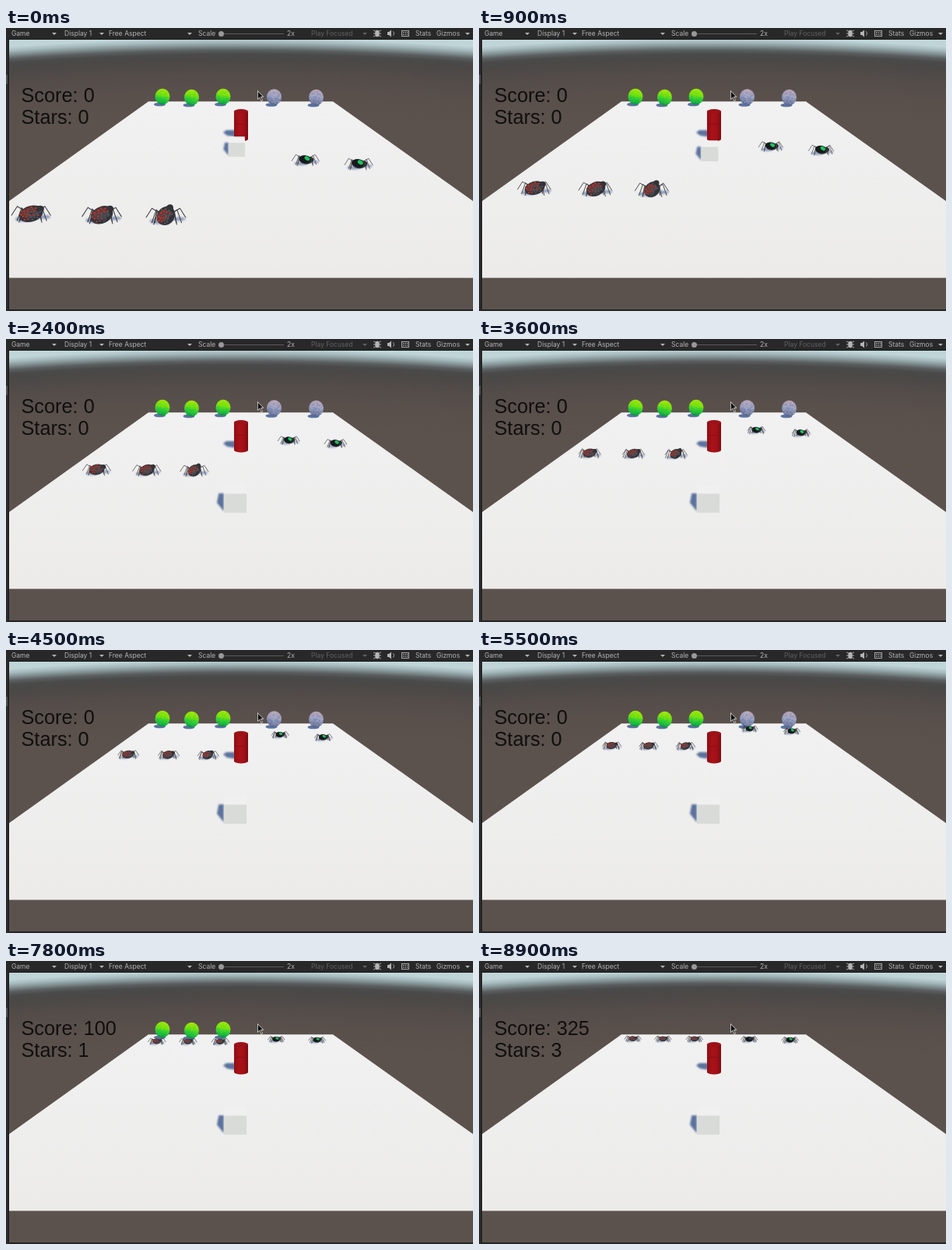
An HTML page with a canvas that plays this animation: 600x363 px, repeating every 9 s.

```html
<!DOCTYPE html>
<html lang="en">
<head>
<meta charset="utf-8">
<title>Spiders and stars</title>
<style>
html, body { margin: 0; width: 100%; height: 100%; overflow: hidden; background: #5b524d; }
canvas { display: block; }
</style>
</head>
<body>
<canvas id="stage" width="600" height="363"></canvas>
<script>
const g = document.getElementById('stage').getContext('2d');
const LOOP = 9000, STEP = 100;
const VX = 302, VY = 11; // vanishing point
const SHADOW = '#536a99';

const clamp = (v, a, b) => Math.min(b, Math.max(a, v));
const rand = i => { const v = Math.sin(i * 127.1 + 3) * 43758.5; return v - Math.floor(v); };

function rect(x, y, w, h, color) {
  g.fillStyle = color;
  g.fillRect(x, y, w, h);
}
function poly(points, color) {
  g.beginPath();
  points.forEach(p => g.lineTo(...p));
  g.closePath();
  g.fillStyle = color;
  g.fill();
}
function oval(x, y, rx, ry, color, angle = 0) {
  g.beginPath();
  g.ellipse(x, y, rx, ry, angle, 0, 7);
  g.fillStyle = color;
  g.fill();
}
function label(text, x, y, color = '#b5b5b5', font = '8.5px Inter, sans-serif') {
  g.font = font;
  g.fillStyle = color;
  g.fillText(text, x, y);
}
function shade(gradient, stops) {
  stops.forEach(([at, color]) => gradient.addColorStop(at, color));
  return gradient;
}
function softly(blur, alpha, draw) {
  g.save();
  g.filter = `blur(${blur}px)`;
  g.globalAlpha = alpha;
  draw();
  g.restore();
}

// u: sideways place, w: depth (1 / size); both change linearly with time
const spiders = [
  { u: -1.187, du: .001, w: .0044, dw: .00083, end: 8.3, rx: .069, ry: .045, tilt: -.3, red: true },
  { u: -.782, du: .0052, w: .00437, dw: .00083, end: 8.3, rx: .066, ry: .047, tilt: -.45, red: true },
  { u: -.42, du: .0165, w: .00435, dw: .00083, end: 8.3, rx: .056, ry: .048, tilt: -.9, red: true },
  { u: .524, du: -.003, w: .00633, dw: .00087, end: 5.6, rx: .054, ry: .036, tilt: .2 },
  { u: .926, du: .0265, w: .00613, dw: .00084, end: 5.9, rx: .056, ry: .037, tilt: .2 }
];
const balls = [
  { x: 201, y: 88, points: 75 },
  { x: 238.5, y: 89, points: 75 },
  { x: 279, y: 88, points: 75 },
  { x: 344.5, y: 88.5, points: 50 },
  { x: 398.5, y: 89, points: 50 }
];

function toolbar() {
  rect(0, 0, 600, 14, '#282828');
  [['Game', 7], ['Display 1', 75], ['Free Aspect', 132], ['Scale', 247], ['2x', 361],
   ['Stats', 526], ['Gizmos', 553]].forEach(([text, x]) => label(text, x, 10));
  label('Play Focused', 392, 10, '#626262');
  [62, 123, 236, 461, 593].forEach(x =>
    poly([[x - 3, 6], [x + 3, 6], [x, 9]], x === 461 ? '#626262' : '#b5b5b5'));
  rect(276, 7, 81, 1, '#5c5c5c');
  oval(276.5, 7.5, 3.5, 3.5, '#999');

  // debug, sound and keyboard icons
  g.strokeStyle = '#b5b5b5';
  g.lineWidth = .9;
  g.beginPath();
  for (const slope of [-2, 0, 2]) {
    g.moveTo(472, 7 + slope * 2); g.lineTo(477, 7 + slope); g.lineTo(482, 7 + slope * 2);
  }
  g.stroke();
  oval(477, 7, 2.8, 4.3, '#b5b5b5');
  poly([[490, 5], [492, 5], [495, 2.5], [495, 11.5], [492, 9], [490, 9]], '#b5b5b5');
  g.beginPath();
  g.arc(495, 7, 3.5, -.9, .9);
  g.stroke();
  g.strokeRect(508.5, 3.5, 9, 7);
  for (let i = 0; i < 6; i++) rect(510 + i % 3 * 2.5, 5 + (i > 2) * 2.5, 1.3, 1.3, '#b5b5b5');
}

function border() {
  rect(0, 14, 4, 349, '#2a2a2a');
  rect(0, 60, 2, 12, '#505050');
  rect(3, 14, 1, 348, '#1b1b1b');
  rect(3, 14, 597, 1, '#1b1b1b');
  rect(3, 361, 597, 1, '#1f1f1f');
  rect(0, 362, 600, 1, '#2a2a2a');
}

function scenery() {
  const sky = g.createRadialGradient(VX, 4015, 3900, VX, 4015, 4002);
  g.fillStyle = shade(sky, [[0, '#5b524d'], [.3, '#59504c'], [.55, '#534c49'], [.72, '#4b4846'],
    [.8, '#4a4a4a'], [.85, '#5b5f60'], [.9, '#819092'], [.95, '#a6babd'], [1, '#bfd5d8']]);
  g.fillRect(4, 14, 596, 349);
  const floor = g.createLinearGradient(0, 95, 0, 321);
  shade(floor, [[0, '#f1f1f1'], [1, '#ecebea']]);
  poly([[183, 94.3], [420, 94.3], [600, 222], [600, 320.6], [4, 320.6], [4, 222]], floor);
}

function ball({ x, y, points }, seed) {
  const green = points === 75;
  softly(.7, .95, () => oval(x - 3.5, y + 10, 7.5, 2.3, SHADOW));
  const fill = g.createLinearGradient(x + 2, y - 10, x - 2, y + 10);
  shade(fill, green
    ? [[0, '#a4e80a'], [.4, '#74e010'], [.6, '#32cf36'], [.85, '#14b045'], [1, '#0d8f43']]
    : [[0, '#b9a5b8'], [.5, '#919bbd'], [.8, '#6e7ca3'], [1, '#55648c']]);
  oval(x, y, 9.5, 10.3, fill);
  const tints = green ? ['#b4f000', '#2bc934'] : ['#cf97a2', '#6a80b2', '#c2c6d6'];
  g.globalAlpha = green ? .3 : .6;
  for (let i = 0; i < 38; i++) {
    const a = i * 2.4, r = Math.sqrt(i / 38) * 8.5;
    const tint = tints[Math.floor(rand(i + seed * 50) * tints.length)];
    rect(x + r * Math.cos(a) - .6, y + r * Math.sin(a) - .6, 1.5, 1.3, tint);
  }
  g.globalAlpha = 1;
}

function cylinder() {
  softly(.9, .95, () => poly([[294, 131], [283, 131], [279, 134], [284, 138], [294, 139.5]], SHADOW));
  const side = g.createLinearGradient(293, 0, 311, 0);
  shade(side, [[0, '#8d0e15'], [.35, '#a91219'], [.7, '#a01017'], [1, '#7b0b11']]);
  oval(302, 142.5, 9, 3, side);
  rect(293, 107, 18, 35.5, side);
  oval(302, 107, 9.2, 3, '#9c1118');
  rect(293, 123, 18, 1, '#8b0d14');
}

function cube(t) {
  const s = 1 / (.00649 - .0017 * clamp(t - .76, 0, 1.04));
  const x = VX - .0355 * s, base = VY + s;
  const half = .069 * s, top = base - .115 * s, back = top - .052 * s;
  softly(.8, .95, () => poly([[x - half, back + .05 * s], [x - half - .031 * s, back + .05 * s],
    [x - half - .042 * s, base - .06 * s], [x - half, base - .008 * s]], SHADOW));
  poly([[x - half, top], [x - half * .96, back], [x + half * .96, back], [x + half, top]], '#f0f0f0');
  rect(x - half, top, half * 2, base - top, '#d9dbd8');
}

function spider(p, t, seed) {
  const walk = Math.min(t, p.end);
  const s = 1 / (p.w + p.dw * walk);
  const near = 1 - walk / p.end;
  const rx = .056 + (p.rx - .056) * near, ry = .038 + (p.ry - .038) * near;
  const reach = 1 - .15 * near;
  g.save();
  g.translate(VX + (p.u + p.du * walk) * s, VY + s);
  g.scale(s, s);

  softly(.9, .6, () => {
    oval(-.035, .03, .055, .016, SHADOW);
    oval(.07, .018, .04, .011, SHADOW);
  });

  g.strokeStyle = '#3c3c40';
  g.lineWidth = Math.max(.0045, .65 / s);
  g.lineJoin = 'round';
  for (const side of [-1, 1]) {
    for (let i = 0; i < 4; i++) {
      const swing = walk < p.end ? .009 * Math.sin(t * 13 + i * 2 + side) : 0;
      const x = d => side * d * reach + swing;
      g.beginPath();
      g.moveTo(side * .03, -.012);
      g.lineTo(x(.083 - i * .011), -.042 + i * .008);
      g.lineTo(x(.122 - i * .02), [.01, .04, .05, .04][i]);
      g.stroke();
    }
  }

  g.rotate(p.tilt * near);
  oval(rx * .8, -.01, .024, .02, '#303034');
  oval(0, 0, rx, ry, '#34353a');
  if (p.red) {
    oval(-rx * .2, -ry * .35, rx * .72, ry * .5, '#6d3533');
    oval(rx * .1, ry * .1, rx * .6, ry * .4, '#45464c');
    for (let i = 0; i < 26; i++) {
      const a = i * 2.4, r = Math.sqrt(i / 26) * .86;
      const dx = r * Math.cos(a), dy = r * Math.sin(a);
      const lit = rand(i + seed * 40) - dy * .4 - dx * .25;
      const color = lit > .6 ? '#b8382f' : lit > .2 ? '#52545a' : '#2f3035';
      oval(rx * dx, ry * dy, .006, .005, color);
    }
  } else {
    oval(-rx * .1, -ry * .05, rx * .85, ry * .85, '#15191c');
    const turned = seed === 3 && t > 7.8;
    oval(rx * .2, -ry * .35, rx * .42, ry * .42, turned ? '#303c4c' : '#1cc45c', .4);
  }
  g.restore();
}

function cursor() {
  poly([[323, 80], [323, 92], [325.8, 89.6], [327.7, 94], [330, 93], [328.1, 88.8], [331.5, 88.5]], '#ddd');
  poly([[323.8, 81.8], [323.8, 90.4], [326.1, 88.4], [328.1, 93], [329, 92.5], [327, 88.1], [329.8, 87.8]], '#080808');
}

function draw(t) {
  const caught = i => t >= spiders[i].end;
  const score = balls.reduce((sum, b, i) => sum + (caught(i) ? b.points : 0), 0);
  scenery();
  toolbar();
  balls.forEach((b, i) => caught(i) || ball(b, i));
  cylinder();
  cube(t);
  spiders.forEach((p, i) => spider(p, t, i));
  border();
  const font = '25.3px "Liberation Sans", Arial, sans-serif';
  label('Score: ' + score, 19.5, 94.7, '#100f0e', font);
  label('Stars: ' + Math.floor(score / 100), 19.5, 122.7, '#100f0e', font);
  cursor();
}

function tick() {
  draw(Math.floor(performance.now() % LOOP / STEP) * STEP / 1000);
  requestAnimationFrame(tick);
}
tick();
</script>
</body>
</html>
```
